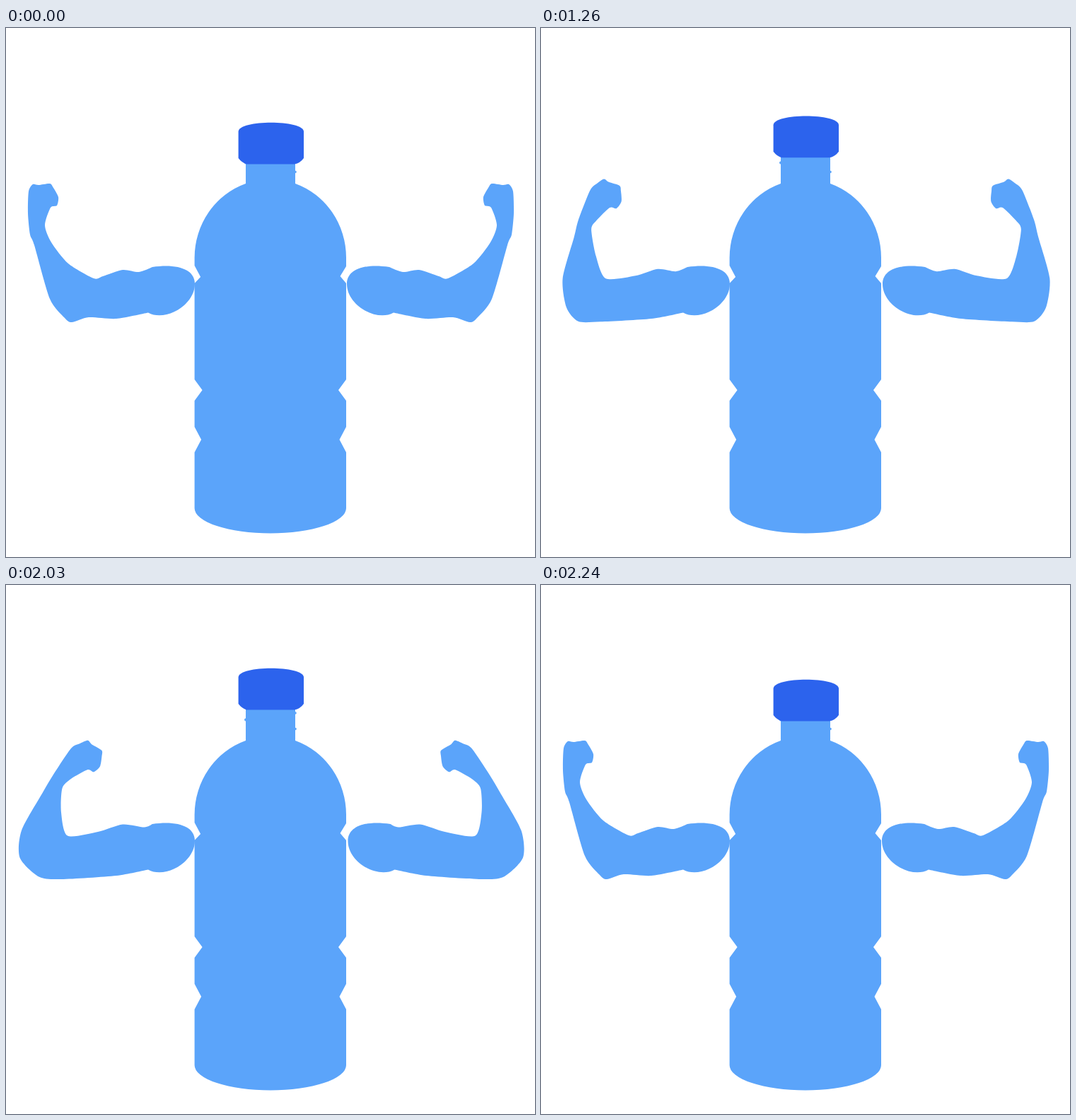
An HTML page for the animation above (2.31 s loop, 748 px wide and 748 px high).

```html
<!DOCTYPE html>
<html lang="en">
<head>
<meta charset="utf-8">
<title>Flexing bottle</title>
<style>
  html, body { margin: 0; width: 100%; height: 100%; overflow: hidden; background: #fff; }
  svg { display: block; width: 100%; height: 100%; }
</style>
</head>
<body>
<svg viewBox="0 0 748 748" fill="#5ba4fa">
  <path d="M339 175.500V220A107.200 111 0 0 0 266.600 325V336l8.500 16 -8.500 9V497l11 15 -11 15V564l9.500 18 -9.500 18V679
           A107.200 35.500 0 0 0 481 679V600l-9.500 -18 9.500 -18V527l-11 -15 11 -15V361l-8.500 -10 8.500 -14V325
           A107.200 111 0 0 0 409 220V175.500Z"/>
  <circle cx="339" cy="190.500" r="2"/>
  <circle cx="409" cy="181" r="1.800"/>
  <circle cx="409" cy="203.500" r="1.800"/>
  <path id="arm"/>
  <use id="mirror" href="#arm"/>
  <path id="cap" fill="#2c63ed" d="M328.600 146.500C328.600 129.500 421 129.500 421 146.500V184Q416 191 408 192.600H340Q333 190 328.600 184Z"/>
</svg>
<script>
const LOOP = 2310, STEP = 70, FLEX = 1190, RELAX = 2030;
const el = id => document.getElementById(id);

// Key poses of the left arm at steps 0, 1 and 4; the fist is [x, y, degrees].
const open = {
  outer: [[117, 409], [93, 416], [83, 410], [62, 383], [40, 307], [34, 292], [31, 262]],
  fist: [54, 237, 0],
  inner: [[55, 279], [64, 303], [88, 333], [124, 354], [137, 351], [165, 342], [188, 345]]
};
const raised = {
  outer: [[97, 413], [68, 416], [57, 403], [44, 366], [43, 300], [42, 279], [49, 240]],
  fist: [75, 233, 13],
  inner: [[66, 274], [66, 290], [81, 326], [104, 354], [136, 351], [165, 342], [188, 345]]
};
const flexed = {
  outer: [[80, 415], [50, 409], [8, 375], [18, 345], [56, 297], [84, 270], [117, 244]],
  fist: [141, 255.5, 50],
  inner: [[107, 279], [91, 298], [82, 324], [90, 355], [125, 347], [165, 335], [203, 340]]
};
const knuckles = [[-22, -6], [-16, -16], [-8, -15], [8, -17], [13, -11], [20, 2], [18, 14], [9, 17]];
const armpit = [201, 402.5], triceps = [156, 411], deltoid = [207, 338];

// Parabola through a, b and c at steps 0, 1 and 4
const along = (s, a, b, c) =>
  a * (s - 1) * (s - 4) / 4 - b * s * (s - 4) / 3 + c * s * (s - 1) / 12;

const blend = (s, part) => open[part].map((p, i) =>
  p.map((v, k) => along(s, v, raised[part][i][k], flexed[part][i][k])));

function fistAt(s) {
  const [x, y, deg] = open.fist.map((v, k) => along(s, v, raised.fist[k], flexed.fist[k]));
  const c = Math.cos(deg * Math.PI / 180), n = Math.sin(deg * Math.PI / 180);
  return knuckles.map(([u, v]) => [x + u * c - v * n, y + u * n + v * c]);
}

// Smooth curve through all points
function spline(pts) {
  const at = i => pts[Math.max(0, Math.min(pts.length - 1, i))];
  const handle = (i, sign) => at(i).map((v, k) => v + sign * (at(i + 1)[k] - at(i - 1)[k]) / 8);
  return 'M' + pts[0] + pts.slice(1).map((p, i) =>
    `C${handle(i, 1)} ${handle(i + 1, -1)} ${p}`).join('');
}

function pose(s) {
  const line = [armpit, triceps, ...blend(s, 'outer'), ...fistAt(s), ...blend(s, 'inner'), deltoid];
  el('arm').setAttribute('d', spline(line) + 'C240 333 267 340 267 362C267 392 225 416 201 402.5Z');
  el('mirror').setAttribute('transform', `translate(${749 + s / 2} 0) scale(-1 1)`);
  el('cap').setAttribute('transform', `translate(0 ${-along(s, 0, 4, 24)})`);
}

const stepsSince = (t, from) =>
  t < from ? 0 : Math.min(4, Math.floor((t - from) / STEP) + 1);

const start = performance.now();
function draw() {
  const t = (performance.now() - start) % LOOP;
  pose(stepsSince(t, FLEX) - stepsSince(t, RELAX));
  requestAnimationFrame(draw);
}
draw();
</script>
</body>
</html>
```
